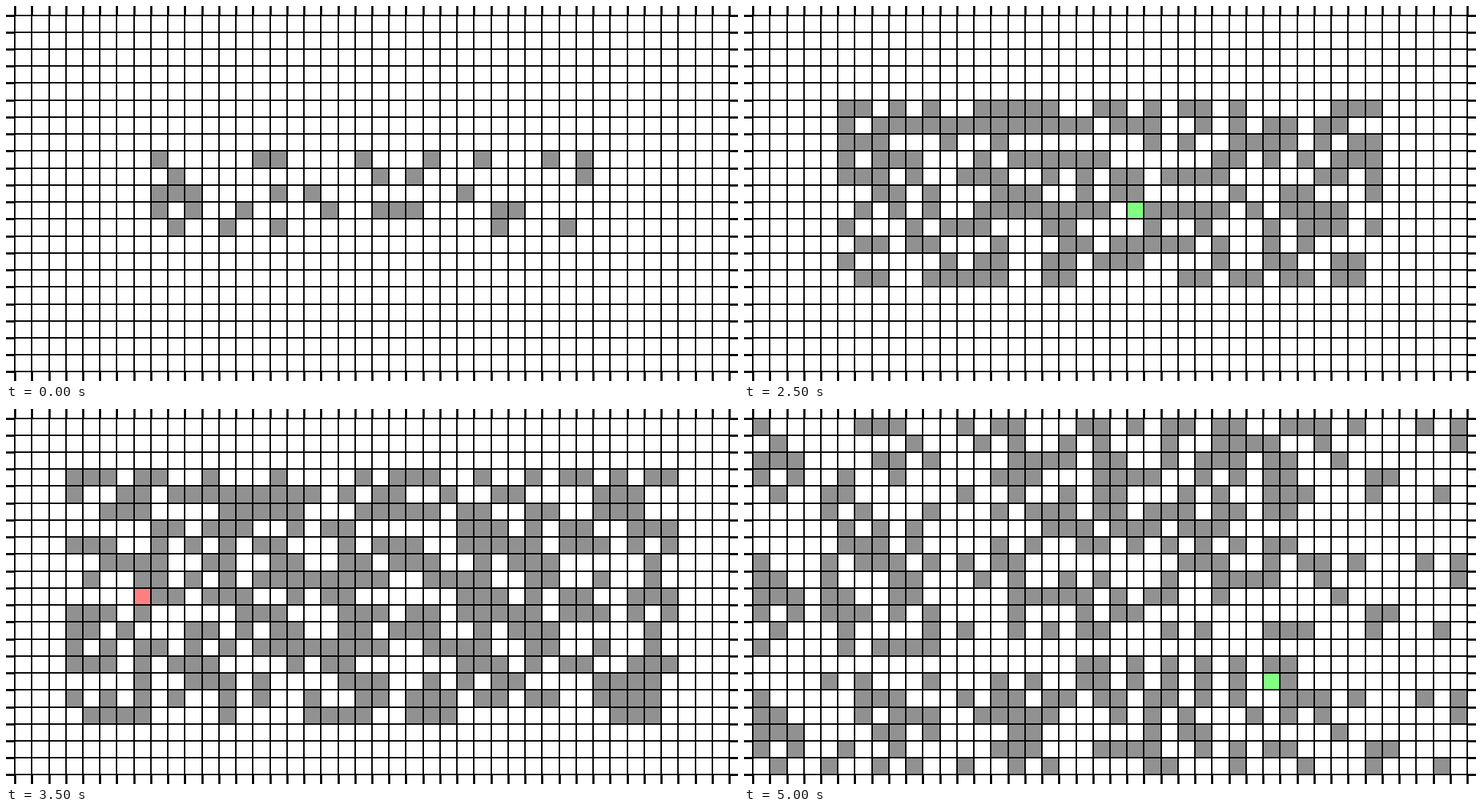
An HTML page with a canvas for the animation above (6.5 s loop, 1000x513 px).

```html
<!DOCTYPE html>
<html lang="en">
<head>
<meta charset="utf-8">
<title>Parity automaton with single-cell errors</title>
<style>
  html, body { margin: 0; width: 100%; height: 100%; overflow: hidden; background: #fff; }
  canvas { display: block; }
</style>
</head>
<body>
<canvas id="stage" width="1000" height="513"></canvas>
<script>
const COLS = 42, ROWS = 21, PITCH = 23.2365, LINE = 2;
const LEFT = 13.04, TOP = 13.53;
const FIRST_HOLD = 1500, STEP = 500, LOOP = 6500;
const ALIVE = '#919191', TURNED_ON = '#ff8080', TURNED_OFF = '#80ff80';

// Live columns of the seed, for rows 8 to 12.
const seed = [
  [8, 14, 15, 20, 24, 27, 31, 33],
  [9, 21, 23, 33],
  [8, 9, 10, 15, 17, 26],
  [8, 10, 13, 18, 21, 22, 23, 28, 29],
  [9, 12, 15, 28, 32]
];
// One cell [column, row] is flipped after each generation.
const errors = [[24, 8], [10, 11], [22, 11], [4, 13], [7, 10], [7, 6], [23, 11], [30, 15]];

const makeGrid = cell => Array.from({ length: ROWS }, (_, r) =>
  Array.from({ length: COLS }, (_, c) => cell(c, r)));

// A cell lives when its 3 x 3 block holds an odd number of live cells.
function evolve(grid) {
  return makeGrid((c, r) => {
    let parity = 0;
    for (let y = r - 1; y <= r + 1; y++)
      for (let x = c - 1; x <= c + 1; x++) parity ^= grid[y]?.[x] ?? 0;
    return parity;
  });
}

const generations = [makeGrid((c, r) => seed[r - 8]?.includes(c) ? 1 : 0)];
for (const [c, r] of errors) {
  const next = evolve(generations.at(-1));
  next[r][c] ^= 1;
  generations.push(next);
}

const ctx = document.getElementById('stage').getContext('2d');
const cellX = c => Math.round(LEFT + c * PITCH);
const cellY = r => Math.round(TOP + r * PITCH);

function fillCell(c, r, color) {
  const x = cellX(c), y = cellY(r);
  ctx.fillStyle = color;
  ctx.fillRect(x, y, cellX(c + 1) - LINE - x, cellY(r + 1) - LINE - y);
}

function drawGrid() {
  const left = cellX(0) - LINE, right = cellX(COLS);
  const top = cellY(0) - LINE, bottom = cellY(ROWS);
  ctx.fillStyle = '#fff';
  ctx.fillRect(0, 0, 1000, 513);
  ctx.fillStyle = '#000';
  ctx.fillRect(left, top, right - left, bottom - top);
  // Slightly heavier stubs run from the field to the stage edge.
  for (let c = 0; c <= COLS; c++) {
    const x = cellX(c) - LINE;
    ctx.fillRect(x, 0, 3, top);
    ctx.fillRect(x, bottom, 3, 513 - bottom);
  }
  for (let r = 0; r <= ROWS; r++) {
    const y = cellY(r) - LINE;
    ctx.fillRect(0, y, left, 3);
    ctx.fillRect(right, y, 1000 - right, 3);
  }
}

function draw(index) {
  const grid = generations[index];
  drawGrid();
  grid.forEach((row, r) => row.forEach((on, c) => fillCell(c, r, on ? ALIVE : '#fff')));
  if (index > 0) {
    const [c, r] = errors[index - 1];
    fillCell(c, r, grid[r][c] ? TURNED_ON : TURNED_OFF);
  }
}

let shown = -1;
function tick() {
  const time = performance.now() % LOOP;
  const index = time < FIRST_HOLD ? 0
    : Math.min(errors.length, 1 + Math.floor((time - FIRST_HOLD) / STEP));
  if (index !== shown) draw(shown = index);
  requestAnimationFrame(tick);
}
tick();
</script>
</body>
</html>
```
